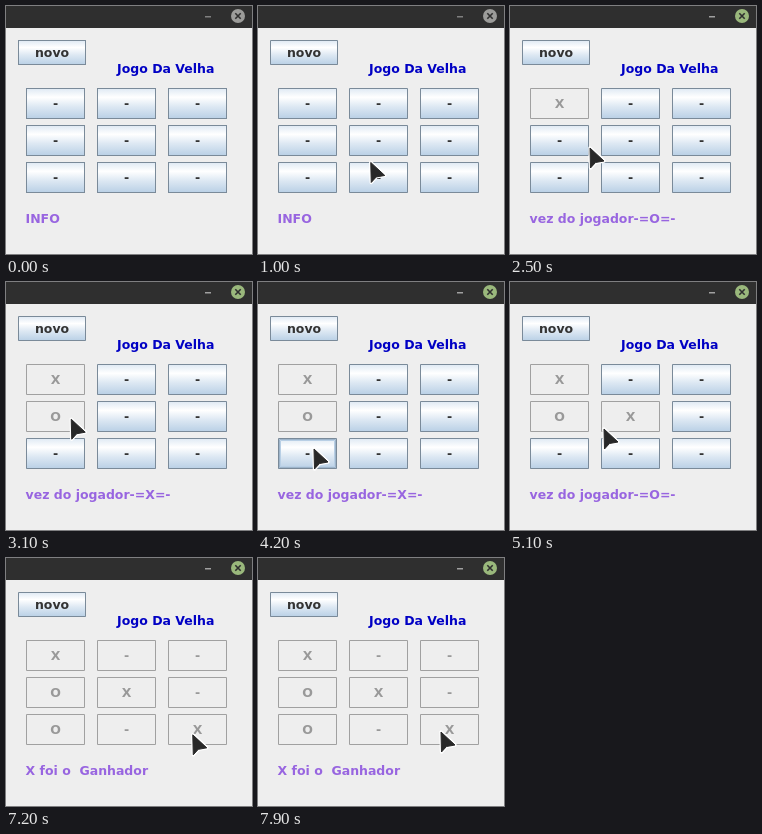
An HTML page with a canvas that plays this animation: 246 px wide and 248 px high, repeating every 8300 ms.

```html
<!DOCTYPE html>
<html lang="pt">
<head>
<meta charset="utf-8">
<title>Jogo Da Velha</title>
<style>
  html, body { margin: 0; width: 100%; height: 100%; overflow: hidden; background: #eee; }
  canvas { display: block; width: 246px; height: 248px; }
</style>
</head>
<body>
<canvas id="stage" width="246" height="248"></canvas>
<script>
const ctx = document.getElementById('stage').getContext('2d');
const LOOP = 8300, STEP = 100;
const FOCUS_AT = 1800, WIN_AT = 7100;
const CELL_W = 59, CELL_H = 31;

// Pointer path: time, x, y
const path = [
  [100, 200, 198], [400, 184, 132], [600, 146, 104], [900, 118, 162],
  [1400, 58, 99], [2100, 58, 99], [2500, 79, 141], [2800, 58, 136],
  [3000, 58, 136], [3500, 118, 138], [3700, 118, 138], [4200, 55, 166],
  [4300, 55, 166], [4800, 93, 146], [5100, 93, 146], [5400, 57, 170],
  [6000, 57, 170], [6400, 108, 171], [6800, 186, 176], [7100, 186, 176],
  [7800, 182, 173]
];

const moves = [
  { cell: 0, press: 1800, at: 1900, mark: 'X' },
  { cell: 3, press: 3000, at: 3100, mark: 'O' },
  { cell: 4, press: 5100, at: 5100, mark: 'X' },
  { cell: 6, press: 6000, at: 6100, mark: 'O' },
  { cell: 8, press: 7000, at: WIN_AT, mark: 'X' }
];

function pointerAt(t) {
  if (t < path[0][0]) return null;
  const i = path.findIndex(p => p[0] > t);
  if (i < 0) return path[path.length - 1].slice(1);
  const [t0, x0, y0] = path[i - 1], [t1, x1, y1] = path[i];
  const u = (t - t0) / (t1 - t0), e = u * u * (3 - 2 * u);
  return [x0 + (x1 - x0) * e, y0 + (y1 - y0) * e];
}

function text(str, x, y, color, align = 'left') {
  ctx.font = 'bold 12.5px "DejaVu Sans", sans-serif';
  ctx.textAlign = align;
  ctx.fillStyle = color;
  ctx.fillText(str, x, y);
}

function frame(x, y, w, h, color) {
  ctx.strokeStyle = color;
  ctx.lineWidth = 1;
  ctx.strokeRect(x + 0.5, y + 0.5, w - 1, h - 1);
}

function button(x, y, w, h, label, state) {
  const off = state === 'disabled', down = state === 'pressed';
  if (down) {
    ctx.fillStyle = '#b8cfe5';
  } else if (off) {
    ctx.fillStyle = '#eee';
  } else {
    const g = ctx.createLinearGradient(0, y, 0, y + h);
    g.addColorStop(0, '#dde8f3');
    g.addColorStop(0.3, '#fff');
    g.addColorStop(0.6, '#dde8f3');
    g.addColorStop(1, '#b8cfe5');
    ctx.fillStyle = g;
  }
  ctx.fillRect(x, y, w, h);
  if (state === 'hover') {
    frame(x + 1, y + 1, w - 2, h - 2, '#9db4ca');
    frame(x + 2, y + 2, w - 4, h - 4, '#b8cfe5');
  }
  if (down) {
    ctx.fillStyle = '#7a8a99';
    ctx.fillRect(x + 1, y + 1, w - 2, 1);
    ctx.fillRect(x + 1, y + 1, 1, h - 2);
  }
  frame(x, y, w, h, off ? '#a0a0a0' : '#7a8a99');
  text(label, x + w / 2, y + h / 2 + 4.5, off ? '#999' : '#333', 'center');
}

function titleBar(active) {
  ctx.fillStyle = '#2f2f2f';
  ctx.fillRect(0, 0, 246, 22);
  ctx.fillStyle = active ? '#a0a0a0' : '#808080';
  ctx.fillRect(199, 10, 6, 1.5);
  ctx.fillStyle = active ? '#9ab87c' : '#9c9c9a';
  ctx.beginPath();
  ctx.arc(232, 10, 7, 0, Math.PI * 2);
  ctx.fill();
  ctx.strokeStyle = '#2f2f2f';
  ctx.lineWidth = 1.6;
  ctx.beginPath();
  ctx.moveTo(229.3, 7.3); ctx.lineTo(234.7, 12.7);
  ctx.moveTo(234.7, 7.3); ctx.lineTo(229.3, 12.7);
  ctx.stroke();
}

function pointer([x, y]) {
  ctx.beginPath();
  ctx.moveTo(x + 1, y + 1);
  ctx.lineTo(x + 1.5, y + 21);
  ctx.lineTo(x + 6.5, y + 15.5);
  ctx.lineTo(x + 15, y + 14);
  ctx.closePath();
  ctx.lineJoin = 'round';
  ctx.lineWidth = 3.4;
  ctx.strokeStyle = '#fff';
  ctx.stroke();
  ctx.lineWidth = 1;
  ctx.strokeStyle = ctx.fillStyle = '#282828';
  ctx.fill();
  ctx.stroke();
}

function status(t) {
  if (t >= WIN_AT) return 'X foi o  Ganhador';
  const done = moves.filter(m => t >= m.at).length;
  return done ? `vez do jogador-=${done % 2 ? 'O' : 'X'}=-` : 'INFO';
}

function draw(t) {
  const pos = pointerAt(t);
  ctx.fillStyle = '#eee';
  ctx.fillRect(0, 0, 246, 248);
  titleBar(t >= FOCUS_AT);
  button(12, 34, 68, 25, 'novo', 'normal');
  text('Jogo Da Velha', 111, 67, '#0000c4');

  for (let i = 0; i < 9; i++) {
    const x = 20 + (i % 3) * 71, y = 82 + Math.floor(i / 3) * 37;
    const move = moves.find(m => m.cell === i);
    const played = move && t >= move.at;
    const over = pos && pos[0] >= x && pos[0] < x + CELL_W && pos[1] >= y && pos[1] < y + CELL_H;
    let state = 'normal';
    if (played || t >= WIN_AT) state = 'disabled';
    else if (move && t >= move.press) state = 'pressed';
    else if (over) state = 'hover';
    button(x, y, CELL_W, CELL_H, played ? move.mark : '-', state);
  }

  text(status(t), 19.5, 217, '#9865e0');
  if (pos) pointer(pos);
}

const start = performance.now();
function tick() {
  const t = (performance.now() - start) % LOOP;
  draw(Math.floor(t / STEP) * STEP);
  requestAnimationFrame(tick);
}
tick();
</script>
</body>
</html>
```
